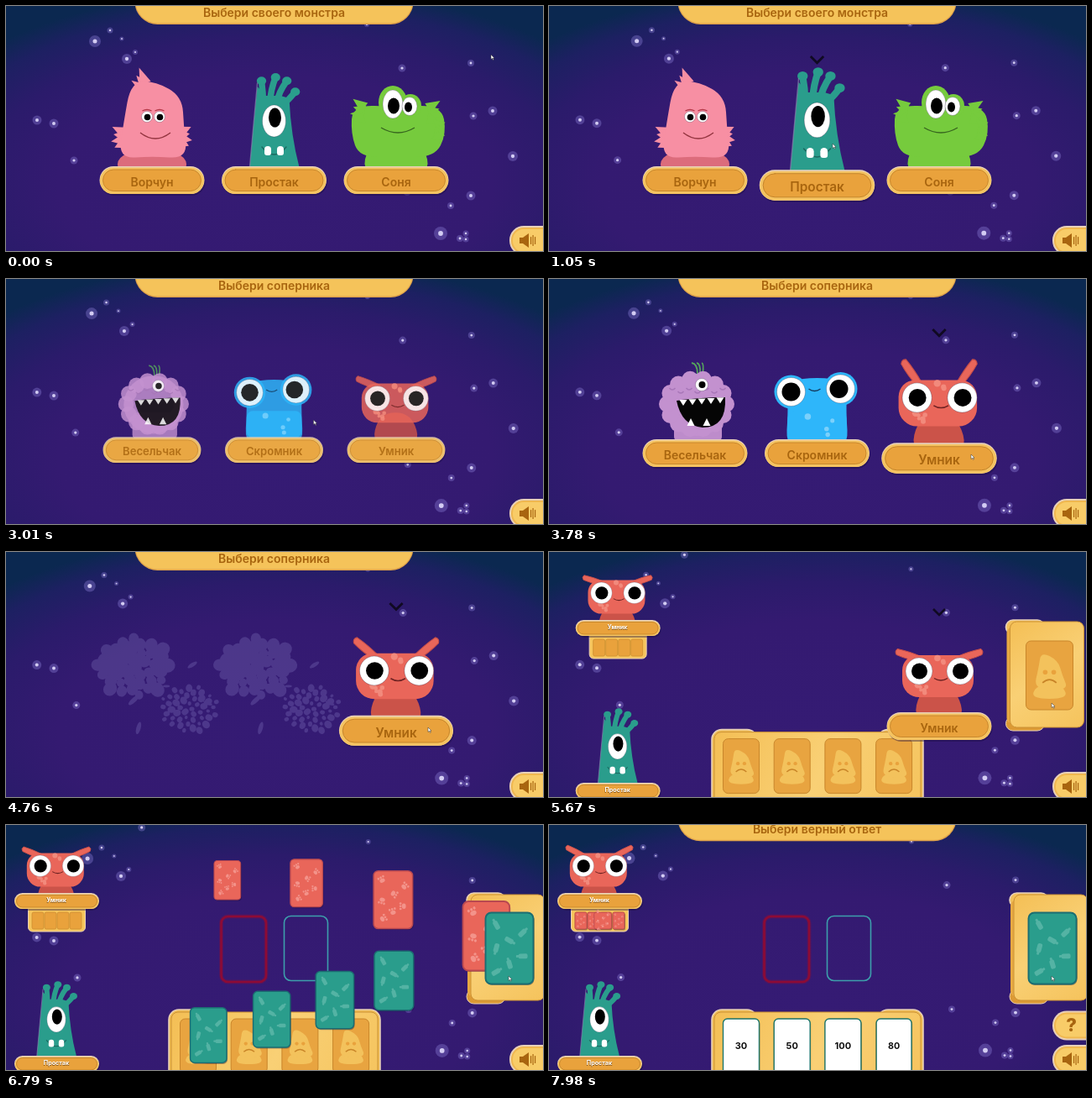
These frames come from a looping animation (640 by 292 pixels, 8000 ms). An HTML page with a canvas:

```html
<!DOCTYPE html>
<html lang="ru">
<head>
<meta charset="utf-8">
<style>
html, body { margin: 0; width: 100%; height: 100%; overflow: hidden; background: #321a6d; }
canvas { display: block; width: 640px; height: 292px; }
</style>
</head>
<body>
<canvas id="stage" width="640" height="292"></canvas>
<script>
const c = document.getElementById('stage').getContext('2d');
const LOOP = 8000, TAU = Math.PI * 2;
const TEAL = '#2a9d8c', RED = '#e9665a', ORANGE = '#e9a23c', BROWN = '#a8650f', CREAM = '#e8d0b8';

// Timing
const ramp = (t, a, b) => Math.min(1, Math.max(0, (t - a) / (b - a)));
const smooth = u => u * u * (3 - 2 * u);
const outQuad = u => 1 - (1 - u) ** 2;
const outBack = (u, s) => 1 + (s + 1) * (u - 1) ** 3 + s * (u - 1) ** 2;
const mix = (a, b, u) => a + (b - a) * u;
const noise = i => { const v = Math.sin(i * 127.1) * 43758.5; return v - Math.floor(v); };

// Drawing
function times(n, draw) { for (let i = 0; i < n; i++) draw(i); }
function paint(fill, stroke, width = 1) {
  if (fill) { c.fillStyle = fill; c.fill(); }
  if (stroke) { c.strokeStyle = stroke; c.lineWidth = width; c.stroke(); }
}
function box(x, y, w, h, r, fill, stroke, width) {
  c.beginPath(); c.roundRect(x, y, w, h, r); paint(fill, stroke, width);
}
function oval(x, y, rx, ry, fill, stroke, width) {
  c.beginPath(); c.ellipse(x, y, rx, ry, 0, 0, TAU); paint(fill, stroke, width);
}
function shape(d, fill, stroke, width = 1) {
  const p = new Path2D(d);
  if (fill) { c.fillStyle = fill; c.fill(p); }
  if (stroke) { c.strokeStyle = stroke; c.lineWidth = width; c.stroke(p); }
}
function triangle(x, y, w, h, fill) {
  c.beginPath(); c.moveTo(x - w / 2, y); c.lineTo(x, y + h); c.lineTo(x + w / 2, y); paint(fill);
}
// Closed curve pulled towards each corner
function blob(corners, fill) {
  c.beginPath();
  corners.forEach(([x, y], i) => {
    const [nx, ny] = corners[(i + 1) % corners.length], [lx, ly] = corners.at(i - 1);
    if (!i) c.moveTo((lx + x) / 2, (ly + y) / 2);
    c.quadraticCurveTo(x, y, (x + nx) / 2, (y + ny) / 2);
  });
  paint(fill);
}
function label(text, x, y, size, color, weight = 600) {
  c.font = `${weight} ${size}px Inter, sans-serif`;
  c.textAlign = 'center'; c.textBaseline = 'middle';
  c.fillStyle = color; c.fillText(text, x, y);
}
function group(draw, { x = 0, y = 0, sx = 1, sy = sx, alpha = 1, turn = 0 }) {
  if (alpha <= 0) return;
  c.save(); c.globalAlpha *= alpha;
  c.translate(x, y); c.rotate(turn); c.scale(sx, sy);
  draw(); c.restore();
}

// Background
const stars = [
  [106, 42, 7], [124, 29, 3.5], [138, 39, 2.5], [144, 63, 6], [154, 55, 3], [160, 5, 4.5],
  [37, 136, 5.5], [57, 140, 5.5], [81, 184, 4.5], [430, 22, 3], [472, 74, 4.5], [554, 68, 4],
  [557, 131, 4.5], [580, 125, 5.5], [604, 179, 6], [478, 222, 4], [530, 238, 4], [554, 226, 5.5],
  [518, 271, 8], [541, 277, 4], [548, 271, 3.5], [548, 278, 3.5]
];
function background(t) {
  group(() => {
    const g = c.createRadialGradient(0, 0, 0, 0, 0, 235);
    g.addColorStop(0, '#351b74');
    g.addColorStop(.55, '#341a71');
    g.addColorStop(.75, '#2b1b6b');
    g.addColorStop(.9, '#1d2062');
    g.addColorStop(1, '#0b2850');
    c.fillStyle = g; c.fillRect(-160, -212, 320, 292);
  }, { x: 320, y: 212, sx: 2, sy: 1 });
  for (const [x, y, r] of stars) {
    const speed = x < 160 ? (y - 140) / 75 : .25;
    const px = x + speed * t / 1000, py = y - .3 * t / 1000;
    oval(px, py, r, r, 'rgba(140,125,215,.38)');
    oval(px, py, r * .36, r * .36, '#d3ccf3');
  }
}

// Monsters: x is relative to the middle, the platform top is at y = 191
function eye(x, y, rx, ry, px, py, prx, pry = prx) {
  oval(x, y, rx, ry, '#fff', 'rgba(40,30,60,.35)', .8);
  oval(px, py, prx, pry, '#000');
}
function tuft(x, y, direction, length, color) {
  times(4, i => group(() => {
    c.beginPath(); c.moveTo(0, -7); c.lineTo(length - i % 2 * 3, 0); c.lineTo(0, 7); paint(color);
  }, { x, y: y + (i - 1.5) * 4, turn: direction + (i - 1.5) * .3 * Math.sign(Math.cos(direction)) }));
}
function spots(n, x, y, w, h, color) {
  times(n, i => {
    const r = 1.5 + 2.5 * noise(i + 4);
    oval(x + w * noise(i + 1), y + h * noise(i + 9), r, r, color);
  });
}
function smile(x, y, w, depth, color) {
  shape(`M${x - w / 2} ${y}Q${x} ${y + depth * 2} ${x + w / 2} ${y}`, null, color, 1.4);
}
function grump() {
  const pink = '#f78fa3';
  blob([[-42, 205], [-40, 172], [40, 172], [42, 205]], '#dc6c7c');
  tuft(-33, 157, Math.PI, 16, pink);
  tuft(34, 156, 0, 14, pink);
  tuft(-8, 98, -2.4, 20, pink);
  blob([[-40, 182], [-34, 140], [-25, 90], [5, 90], [36, 108], [38, 145], [42, 182], [0, 179]], pink);
  for (const x of [-6, 9]) {
    eye(x, 132, 6.5, 6.5, x + .5, 132.5, 3.8);
    smile(x, 125, 11, -1.5, '#b53949');
  }
  smile(4, 151, 36, 7, '#93343f');
}
function simple(t) {
  const look = smooth(ramp(t, 1800, 1950)) * (1 - ramp(t, 2600, 2700));
  const sway = Math.sin(t / 200) * .8;
  c.lineCap = 'round';
  times(4, i => {
    const x = -15 + 18.5 * i - 1.7 * i * i + sway, y = 85 + (i - 1) ** 2 * 4.3, root = -13 + 8 * i;
    shape(`M${root} 116Q${root + i} ${y + 14} ${x} ${y}`, null, TEAL, 7.5);
    oval(x, y, 5.6, 5, TEAL);
  });
  shape('M-29 192Q-25 145-20 96L-10 107 8 107 18 110Q20 154 30 192Z', TEAL);
  shape('M-29 191Q-25 145-20 92', null, 'rgba(140,135,175,.65)', 1.3);
  eye(0, 137, 14, 19, 1 - look * 7, 133 - look, 7.5, 11.5);
  if (look > .5) {
    blob([[-18, 160], [-14, 184], [14, 184], [18, 160], [0, 168]], '#080b0c');
    for (const x of [-8, 8]) box(x - 3.5, 169, 7, 11, [4, 4, 1, 1], '#fff');
  } else {
    smile(0, 168, 29, 9, '#1b6960');
    for (const x of [-7.5, 7.5]) box(x - 4, 167, 8, 11, [4, 4, 3, 3], '#fff');
  }
}
function sleepy() {
  const green = '#76cb3d';
  blob([[-42, 205], [-32, 160], [32, 160], [42, 205]], green);
  blob([[-52, 118], [-54, 152], [-44, 180], [0, 180], [46, 180], [60, 152], [54, 118], [0, 120]], green);
  tuft(-38, 127, Math.PI + .2, 17, green);
  tuft(38, 128, -.1, 17, green);
  tuft(46, 148, .2, 13, green);
  oval(-4, 115, 17, 20, green);
  oval(17, 119, 13, 14, green);
  eye(-4, 117, 12, 17, -3, 119, 7, 9.5);
  eye(16, 119.5, 9, 11, 14.5, 120.5, 4.5, 6);
  smile(2, 145, 40, 6, '#37661f');
}
function cheerful() {
  const lilac = '#c391cf';
  times(3, i => shape(`M${3 + i * 3} 113Q${3 + i * 4} 101 ${-4 + i * 6} 100`, null, '#55a35c', 1.8));
  box(-25, 160, 57, 34, 6, '#bd8ccb');
  oval(2, 150, 38, 37, lilac);
  times(14, i => oval(2 + 35 * Math.cos(i / 14 * TAU), 149 + 30 * Math.sin(i / 14 * TAU), 10, 10, lilac));
  times(7, i => smile(-27 + i * 10, 130 + i % 2 * 4, 7, 2, '#a877b8'));
  eye(8, 126, 7.5, 7.5, 8.5, 126, 4);
  c.save();
  shape('M-22 145Q7 141 36 141Q38 177 9 177Q-16 175-22 145Z', '#050505');
  times(5, i => triangle(-14 + i * 11, 144 - i * .7, 9, 7, '#fff'));
  times(2, i => triangle(-5 + i * 19, 175, 9, -9, '#fff'));
  c.restore();
}
function shy() {
  const blue = '#2eb6fa';
  blob([[-38, 210], [-34, 150], [-38, 118], [38, 118], [34, 150], [38, 210]], blue);
  box(-35, 158, 70, 34, 8, blue);
  for (const [x, y, px] of [[-31, 134.5, -31], [28, 131, 26]]) {
    oval(x, y, 20, 20, blue);
    eye(x, y, 17, 17, px, y, 11);
  }
  smile(-3, 131, 14, 2.5, '#153b5e');
  spots(4, -24, 158, 46, 28, '#7bd0fb');
}
function clever(t) {
  const lift = (35 + 19 * Math.cos((t - 3780) / 1260 * TAU)) * Math.PI / 180;
  for (const side of [-1, 1])
    group(() => shape('M0-3Q17-5 31-4Q34 0 30 3Q16 5 0 3Z', RED, '#c74e49'),
      { x: side * 21, y: 128, sx: side, sy: 1, turn: -side * lift });
  blob([[-32, 205], [-22, 160], [20, 160], [32, 205]], '#cb5349');
  box(-44, 123, 85, 50, [18, 18, 20, 20], RED);
  spots(6, -30, 156, 16, 12, '#f28a7c');
  spots(3, -6, 125, 14, 7, '#f28a7c');
  for (const x of [-24, 25]) eye(x, 142, 16, 16, x + .5, 142, 9.5);
  smile(2, 150.5, 16, 2.5, '#6d2222');
}

function pill(x, y, w, h) {
  const rim = h > 25 ? 4 : 2.5;
  box(x + 1, y + 2, w, h, h / 2, 'rgba(25,10,60,.4)');
  box(x, y, w, h, h / 2, CREAM);
  box(x + .5, y + 1.5, w - 1, h - 1.5, h / 2, '#f5c361');
  box(x + rim, y + rim, w - 2 * rim, h - 2 * rim + .5, h / 2, ORANGE, '#c4842a', .9);
}
function candidate(draw, name, x, t, scale, alpha, chosen) {
  group(() => {
    draw(t);
    pill(-62.5, 191, 125, 33);
    label(name, 0, 210.5, 14, BROWN);
    if (chosen) { c.lineCap = 'butt'; shape('M-7 68L0 75 7 68', null, '#100a22', 2.6); }
  }, { x, y: 147.5 * (1 - scale), sx: scale, alpha });
}

// Golden-angle clouds of crumbs, merged into one flat path
function burst(x, u) {
  const spread = mix(.82, 1.24, outQuad(u));
  c.beginPath();
  const cloud = (n, dx, y, rx, ry, r0, r1, flat) => times(n, i => {
    const a = i * 2.4, d = Math.sqrt((i + .5) / n) * spread, r = mix(r0, r1, noise(i + n));
    const px = x + dx + rx * d * Math.cos(a), py = y + ry * d * Math.sin(a);
    c.moveTo(px, py);
    c.ellipse(px, py, r, r * flat, a, 0, TAU);
  });
  cloud(40, -22, 138, 43, 36, 5, 10, .9);
  cloud(48, 44, 187, 34, 28, 2, 5, .85);
  cloud(9, 0, 160, 72, 60, 3, 8, .35);
  const alpha = Math.min(1, u * 6, (1 - u) * 2.2) * .21;
  paint(`rgba(165,160,225,${alpha})`);
}

// One selection round: the picked monster grows, the others burst
function selection(t, cast, pick, { enter, hover, click, leave }) {
  const pop = smooth(ramp(t, enter, enter + 350));
  const gone = ramp(t, leave, leave + 250);
  const grow = smooth(ramp(t, hover, hover + 200)) - smooth(ramp(t, click + 130, click + 520));
  const u = ramp(t, click, click + 800);
  cast.forEach(([draw, name], i) => {
    const x = 174 + i * 145.5, size = mix(.6, 1, pop);
    if (i === pick) {
      candidate(draw, name, x, t, size + grow * .1 - gone * .4, pop * (1 - gone), t > hover + 60);
    } else {
      candidate(draw, name, x, t, size, pop * (1 - ramp(t, click, click + 130)));
      if (u > 0 && u < 1) burst(x, u);
    }
  });
}

// Game board
function placeholder(x, y, s) {
  group(() => {
    blob([[-17, 22], [-13, 10], [0, 10], [13, 10], [17, 22]], '#f3c25c');
    blob([[-15, 14], [-10, -8], [-8, -22], [8, -14], [12, 0], [18, 14]], '#f3c25c');
    for (const ex of [-4, 4]) oval(ex, -3, 2.2, 2.2, ORANGE);
    smile(0, 7, 13, -3, '#c88428');
  }, { x, y, sx: s });
}
function slot(x, y, w, h) {
  box(x, y, w, h, 6, '#e8a440', '#c8862b');
  placeholder(x + w / 2, y + h / 2, w / 44);
}
function panelFace(x, y, w, h) {
  const g = c.createLinearGradient(x, y, x + w, y + h);
  g.addColorStop(0, '#f4bf55'); g.addColorStop(.5, '#f9d075'); g.addColorStop(1, '#f5c35c');
  box(x, y, w, h, 8, g, '#cc9235');
}
function bottomPanel(y) {
  for (const x of [194, 392]) box(x, y, 54, 100, 12, '#f0bd55', CREAM, 1.6);
  panelFace(197, y + 3, 246, 110);
  times(4, i => slot(207.5 + i * 60.7, y + 11, 43, 65));
}
function deckPanel(x) {
  box(x, 81, 46, 17, 9, '#f2c05a', CREAM, 1.6);
  box(x, 196, 46, 17, 9, '#dc9a34', CREAM);
  box(x + 1, 90, 20, 114, 6, '#e7a942');
  panelFace(x + 5, 83, 88, 126);
  slot(x + 24, 106, 56, 82);
}
function paw() {
  oval(0, 0, 4, 3, '#f3938a');
  for (const s of [-4, 0, 4]) oval(s, -5, 1.6, 1.8, '#f3938a');
}
function bottle() {
  box(-3, -5, 6, 11, 2, '#54b3a4');
  box(-1.5, -8, 3, 4, 1, '#54b3a4');
}
function card(x, y, w, h, red, flip = 1) {
  group(() => {
    const k = w / 58, r = w * .12;
    box(-w / 2 + 1, -h / 2 + 1.5, w, h, r, 'rgba(20,8,50,.35)');
    box(-w / 2, -h / 2, w, h, r, red ? RED : TEAL, red ? '#b84850' : '#1b6d72', Math.max(.8, w / 30));
    times(7, i => group(red ? paw : bottle,
      { x: (i * 2 % 3 - 1) * 16 * k, y: (i - 3) * 9.5 * k, sx: k, turn: i * 1.3 - .5 }));
  }, { x, y, sx: flip, sy: 1 });
}
function answer(value, x, y, flip) {
  group(() => {
    box(-20.5, -31, 43, 66, 5, 'rgba(90,60,20,.4)');
    box(-21.5, -32.5, 43, 66, 5, '#fff', '#1f776c', 1.4);
    label(value, 0, 0, 11, '#111', 700);
  }, { x, y, sx: flip, sy: 1 });
}
function player(draw, name, x, top, drop, t) {
  c.save();
  c.beginPath(); c.rect(-100, -40, 400, top + 50); c.clip();
  group(() => draw(t), { x, y: top - 191 * .8 + drop, sx: .8 });
  c.restore();
  pill(x - 50, top, 101, 19);
  label(name, x, top + 9.8, 7.2, '#8a5717', 800);
  label(name, x, top + 9.3, 7.2, '#fff', 700);
}

const DEAL = 6067, STEP = 100, FLIGHT = 885;
function cards(t) {
  const flight = i => outQuad(ramp(t, DEAL + i * STEP, DEAL + i * STEP + FLIGHT));
  ['30', '50', '100', '80'].forEach((value, i) => {
    const p = flight(i), x = mix(600, 229 + i * 60.7, p), y = mix(147, 263.5, p ** 3.5);
    const turn = Math.cos(Math.PI * ramp(t, 7190 + i * 140, 7590 + i * 140));
    if (turn < 0) answer(value, x, y, -turn);
    else if (p) card(x, y, mix(57, 43, p), mix(85, 65, p), false, turn);
  });
  const chosen = smooth(ramp(t, 7800, 8000));
  times(4, i => {
    const p = flight(i + 4), pick = i === 2 ? chosen : 0;
    if (p) card(mix(600, 38 + i * 15, p) - pick * 4, mix(147, 114, p) - 256 * p * (1 - p),
      mix(58, 14, p) + pick * 7, mix(86, 20, p), true);
  });
}
function game(t) {
  if (t < 5250) return;
  const u = ramp(t, 5250, 6000);
  const slide = (end, distance, overshoot) => end + distance * (1 - outBack(u, overshoot));
  const left = slide(60, -132, 2.3);
  bottomPanel(slide(220, 80, 1.75));
  deckPanel(slide(549, 100, 1.2));
  box(left - 33.5, 92, 68, 35, 5, '#f6c55c', CREAM);
  times(4, i => box(left - 29 + i * 15, 104, 14, 20, 2, ORANGE, '#cd8e30', .8));
  player(clever, 'Умник', left, 81, 7, t);
  player(simple, 'Простак', left, 275, 0, t);

  group(() => {
    box(256.5, 109, 53.5, 78, 8, null, 'rgba(150,10,50,.3)', 5);
    box(256.5, 109, 53.5, 78, 8, null, '#8d0b35', 2.6);
    box(331.5, 108.5, 52, 77, 8, null, '#3d9fac', 1.6);
  }, { alpha: ramp(t, 5900, 6150) });

  cards(t);
  const deck = smooth(ramp(t, 5850, 6050));
  group(() => card(0, 0, 57, 85, false), { x: 600, y: 147, sx: mix(.6, 1, deck), alpha: deck });
}

// Interface
function header(text, shown) {
  if (shown <= 0) return;
  const y = -28 * (1 - shown);
  box(153.5, y - 60, 332, 82, 27, '#dda04a');
  box(154.5, y - 60, 330, 80.5, 26, '#f5c35a');
  label(text, 319.5, y + 8.5, 14, BROWN);
}
function sideButton(x, y) {
  box(x, y, 70, 35, 17, CREAM);
  box(x + 2, y + 2, 70, 31, 15, '#f0b84f');
  box(x + 4, y + 4, 70, 27, 13, '#f8cc68');
}
function cursor(t) {
  let x = 578, y = 58;
  const move = (from, to, nx, ny) => {
    const u = smooth(ramp(t, from, to));
    x = mix(x, nx, u); y = mix(y, ny, u);
  };
  move(150, 800, 338, 164);
  move(1500, 1900, 353, 164);
  move(2900, 3500, 503, 209);
  move(4900, 5500, 599, 180);
  group(() => shape('M0 0V5.5L1.4 4.3 2.6 6.5 3.3 6 2.4 4H4Z', '#fff', '#333', .5), { x, y });
}

const heroes = [[grump, 'Ворчун'], [simple, 'Простак'], [sleepy, 'Соня']];
const rivals = [[cheerful, 'Весельчак'], [shy, 'Скромник'], [clever, 'Умник']];

function render(t) {
  background(t);
  game(t);
  if (t < 2750) selection(t, heroes, 1, { enter: -400, hover: 650, click: 1850, leave: 2480 });
  else if (t < 6000) selection(t, rivals, 2, { enter: 2750, hover: 3350, click: 4550, leave: 5720 });

  header('Выбери своего монстра', 1 - smooth(ramp(t, 2400, 2600)));
  header('Выбери соперника', outQuad(ramp(t, 2700, 3000)) * (1 - smooth(ramp(t, 5150, 5400))));
  header('Выбери верный ответ', outQuad(ramp(t, 7600, 8150)));

  const help = mix(645, 600, outQuad(ramp(t, 7500, 7850)));
  sideButton(help, 221.5);
  label('?', help + 22.5, 239.5, 22, BROWN, 800);
  sideButton(600, 262);
  shape('M612 276H616L623 271V288L616 283H612Z', BROWN);
  times(3, i => box(625 + i * 2.5, 275 - i % 2 * 2, 1.2, 9 + i % 2 * 4, .5, BROWN));
  cursor(t);
}

function frame() {
  render(performance.now() % LOOP);
  requestAnimationFrame(frame);
}
frame();
</script>
</body>
</html>
```
